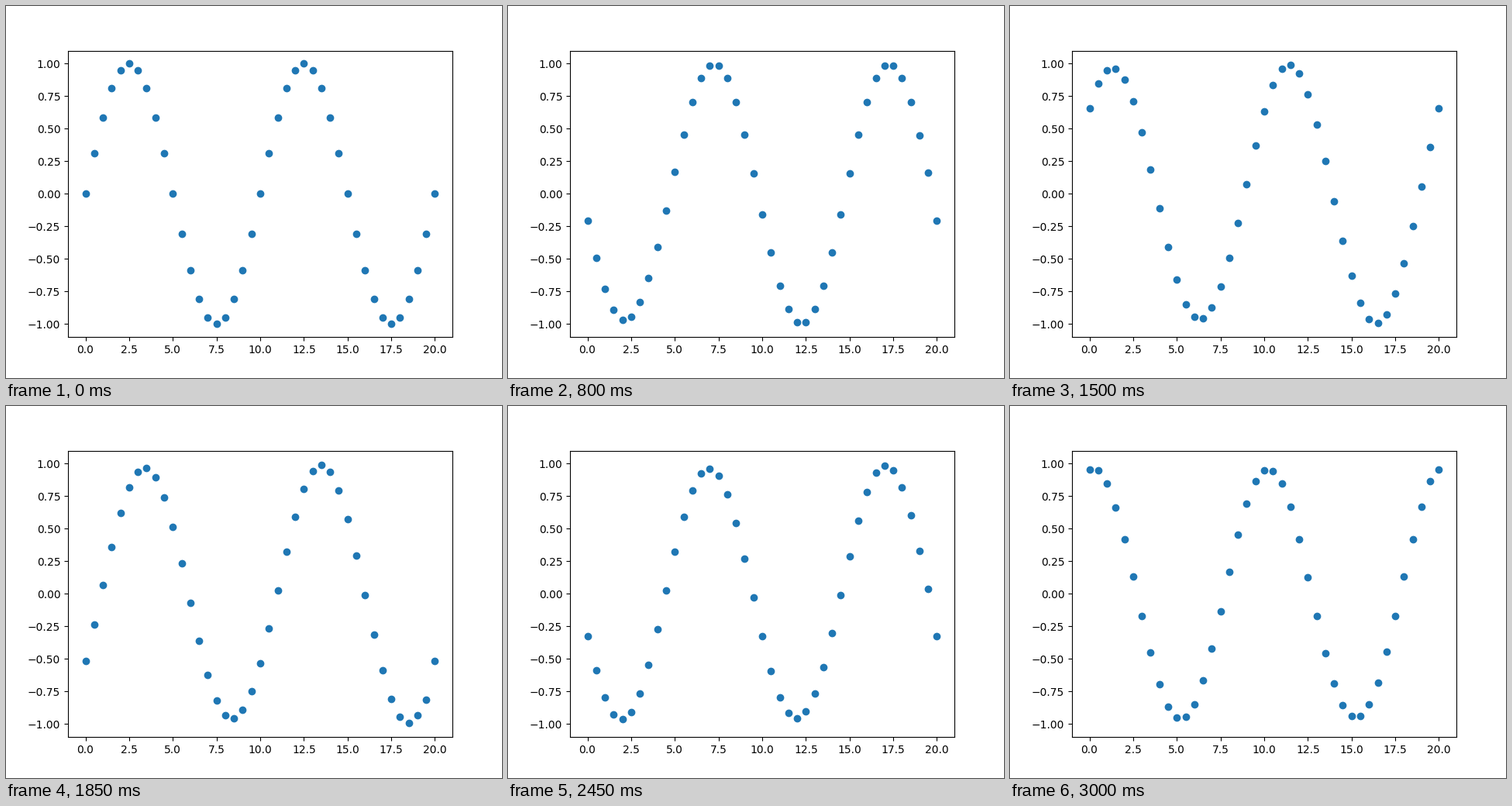
Animation, 640 px wide and 480 px high, one loop 3.05 s. Source, as a matplotlib script:

```python
import numpy as np
import matplotlib.pyplot as plt
from matplotlib.animation import FuncAnimation

LENGTH = 20.0
CELLS = 40
STEPS = 61
CFL = 0.6


def lax_wendroff(u):
    """Advance the advection equation by one time step."""
    left = np.roll(u, 1)
    right = np.roll(u, -1)
    # the last node sees the first node as its right neighbour
    new = u - CFL / 2 * (right - left) + CFL**2 / 2 * (right - 2 * u + left)
    new[0] = new[-1]
    return new


x = np.linspace(0, LENGTH, CELLS + 1)
states = [np.sin(4 * np.pi * x / LENGTH)]
for _ in range(STEPS - 1):
    states.append(lax_wendroff(states[-1]))

fig, ax = plt.subplots(figsize=(6.4, 4.8), dpi=100)
points, = ax.plot(x, states[0], "o")


def update(n):
    points.set_ydata(states[n])
    return points,


anim = FuncAnimation(fig, update, frames=STEPS, interval=50,
                     repeat=True, repeat_delay=0)
plt.show()
```
